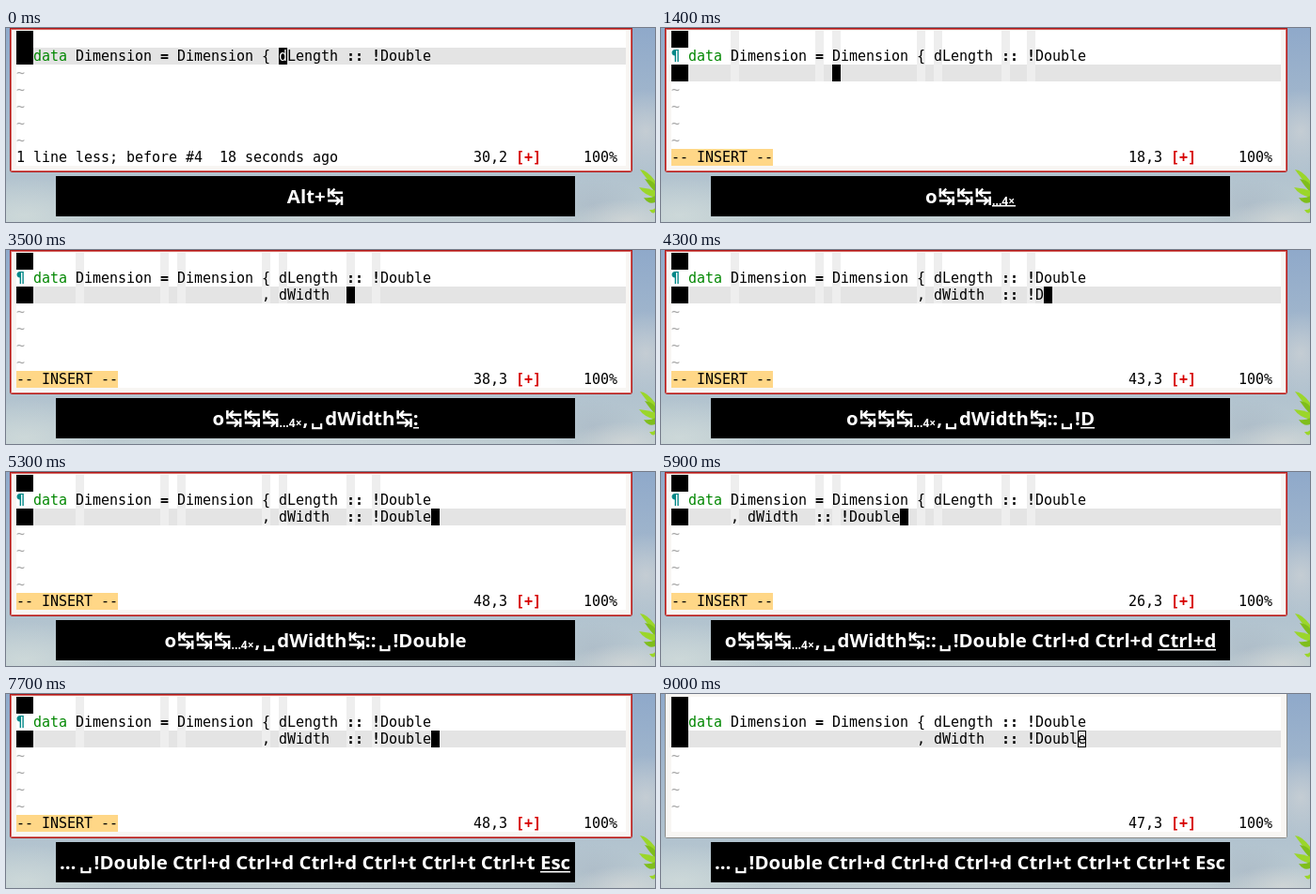
An HTML page with a canvas for the animation above (9.2 s loop, 690 px wide and 207 px high).

```html
<!DOCTYPE html>
<html>
<head>
<meta charset="utf-8">
<style>
html, body { margin: 0; width: 100%; height: 100%; overflow: hidden; background: #b4c4d0; }
canvas { display: block; width: 690px; height: 207px; }
</style>
</head>
<body>
<canvas id="stage" width="690" height="207"></canvas>
<script>
const LOOP = 9200;
const ctx = document.getElementById('stage').getContext('2d');
const MONO = '"DejaVu Sans Mono", monospace';
const SANS = '"Noto Sans", "Open Sans", sans-serif';
const CELL = 9, ROW = 18, LEFT = 11, TOP = 3, TEXT = 29, RIGHT = 659;
const STOPS = [0, 5, 15, 17, 27];
const GUIDES = [5, 15, 17, 27, 29, 37, 40];
const TAB = '↹', SPACE = '␣', REPEAT = '×';

// [time shown in key bar, label, time applied in editor]
const KEYS = [
  [200, 'o', 400], [600, TAB, 700], [1000, TAB, 1000], [1200, TAB, 1200],
  [1400, REPEAT, 1500], [1700, ',', 1900], [1900, SPACE, 2000],
  [2100, 'd', 2200], [2200, 'W', 2300], [2500, 'i', 2500],
  [2800, 'd', 2800], [2800, 't', 2800], [2800, 'h', 2800], [3100, TAB, 3200],
  [3500, ':', 3600], [3600, ':', 3700], [3800, SPACE, 3800], [4000, '!', 4000],
  [4200, 'D', 4300], [4500, 'o', 4500], [4600, 'u', 4700], [4800, 'b', 4800],
  [4900, 'l', 5000], [5100, 'e', 5100],
  [5400, ' Ctrl+d', 5500], [5600, ' Ctrl+d', 5700], [5900, ' Ctrl+d', 5900],
  [6400, ' Ctrl+t', 6400], [6600, ' Ctrl+t', 6700], [6900, ' Ctrl+t', 7000],
  [7700, ' Esc', 7800]
];
const IDLE = [400, 1600, 5300, 6100, 7200, 7900];
const SETTLED = 8800, BLURRED = 9000;

function box(x, y, w, h, color) {
  ctx.fillStyle = color;
  ctx.fillRect(x, y, w, h);
}

function glow(x, y, rx, ry, rgb, alpha) {
  ctx.save();
  ctx.translate(x, y);
  ctx.scale(rx, ry);
  const g = ctx.createRadialGradient(0, 0, 0, 0, 0, 1);
  g.addColorStop(0, `rgba(${rgb},${alpha})`);
  g.addColorStop(1, `rgba(${rgb},0)`);
  ctx.fillStyle = g;
  ctx.fillRect(-1, -1, 2, 2);
  ctx.restore();
}

function drawSky() {
  const g = ctx.createLinearGradient(0, 0, 0, 207);
  g.addColorStop(0, '#8fa9ca');
  g.addColorStop(0.55, '#a9bccd');
  g.addColorStop(1, '#bccbd1');
  ctx.fillStyle = g;
  ctx.fillRect(0, 0, 690, 207);
  glow(20, 200, 90, 40, '212,222,220', 0.7);
  glow(330, 205, 260, 50, '205,216,218', 0.6);
  glow(680, 110, 40, 45, '208,212,214', 0.7);
  glow(625, 190, 50, 30, '168,182,196', 0.6);
  glow(660, 205, 60, 22, '214,217,216', 0.7);
  const tips = [[674, 151], [679, 161], [673, 170], [678, 181], [684, 194]];
  tips.forEach(([x, y], i) => {
    ctx.fillStyle = i % 2 ? '#7fbe1c' : '#9bd62a';
    ctx.beginPath();
    ctx.moveTo(x, y);
    ctx.quadraticCurveTo(x + 9, y + 1, 692, 166 + i * 4);
    ctx.lineTo(692, 173 + i * 4);
    ctx.quadraticCurveTo(x + 6, y + 9, x, y);
    ctx.fill();
  });
}

function drawWindow(focused) {
  ctx.beginPath();
  ctx.roundRect(4, 0, 662, 154, [0, 0, 3, 3]);
  ctx.fillStyle = focused ? '#b01818' : '#8b8b88';
  ctx.fill();
  if (focused) box(5, 1, 660, 152, '#d86a66');
  box(focused ? 6 : 5, focused ? 2 : 0, focused ? 658 : 660, focused ? 150 : 153, '#f8f6f3');
  box(LEFT, TOP, RIGHT - LEFT, 144, '#fff');
}

const rowY = row => TOP + row * ROW;

function type(text, x, row, color = '#000', bold = false) {
  ctx.font = `${bold ? 'bold ' : ''}15px ${MONO}`;
  ctx.fillStyle = color;
  [...text].forEach((c, i) => ctx.fillText(c, x + i * CELL, rowY(row) + 14));
}

function code(text, col, row) {
  let x = TEXT + col * CELL;
  for (const part of text.split(/(data|[=:!]+)/)) {
    type(part, x, row, part === 'data' ? '#008700' : '#000', /^[=:!]/.test(part));
    x += part.length * CELL;
  }
}

function editorState(t) {
  const s = { insert: false, started: false, level: 0, text: '' };
  for (const [, key, at] of KEYS) {
    if (at > t) break;
    if (!s.started) s.started = s.insert = true;
    else if (key === ' Esc') s.insert = false;
    else if (key === ' Ctrl+d') s.level--;
    else if (key === ' Ctrl+t' || key === REPEAT) s.level++;
    else if (key === TAB) { if (s.text) s.text += '  '; else s.level++; }
    else s.text += key === SPACE ? ' ' : key;
  }
  return s;
}

function drawEditor(t) {
  const s = editorState(t);
  const settled = t >= SETTLED, focused = t < BLURRED;
  const line = s.started ? 2 : 1;
  const marks = s.started && !settled;
  const first = 'data Dimension = Dimension { dLength :: !Double';
  let col = s.started ? STOPS[s.level] + s.text.length : 29;
  if (s.started && !s.insert) col--;

  drawWindow(focused);
  box(TEXT, rowY(line), RIGHT - TEXT, ROW, '#e4e4e4');
  if (marks) for (const g of GUIDES) box(TEXT + g * CELL, TOP, CELL, ROW * 3, '#eeeeee');
  for (let r = 0; r <= line; r++) {
    if (!(marks && r === 1)) box(LEFT, rowY(r), 18, ROW, '#000');
  }
  if (marks) type('¶', LEFT, 1, '#008787', true);

  code(first, 0, 1);
  if (s.started) code(s.text, STOPS[s.level], 2);
  for (let r = line + 1; r < 7; r++) type('~', LEFT, r, '#a8a8a8');

  const cx = TEXT + col * CELL, cy = rowY(line);
  if (focused) {
    box(cx, cy, CELL, ROW, '#000');
    const under = s.started ? (s.insert ? '' : 'e') : 'd';
    type(under, cx, line, '#fff');
  } else {
    ctx.strokeStyle = '#000';
    ctx.lineWidth = 1;
    ctx.strokeRect(cx + 0.5, cy + 0.5, CELL - 1, ROW - 1);
  }

  if (s.insert) {
    box(LEFT, rowY(7), 12 * CELL, ROW, '#ffd787');
    type('-- INSERT --', LEFT, 7);
  } else if (!s.started) {
    type('1 line less; before #4  18 seconds ago', LEFT, 7);
  }
  if (s.insert || !s.started || settled) {
    const pos = `${col + 1},${line + 1}`;
    type(pos, 497, 7);
    type('[+]', 497 + (pos.length + 1) * CELL, 7, '#d70000', true);
    type('100%', 614, 7);
  }
}

const BAR_FONT = `bold 20.4px ${SANS}`;

function keyWidth(c) {
  if (c === TAB) return 19.5;
  if (c === SPACE) return 18;
  if (c === REPEAT) return 25;
  ctx.font = BAR_FONT;
  return ctx.measureText(c).width;
}

function drawKey(c, x, w) {
  ctx.fillStyle = '#fff';
  if (c === TAB || c === SPACE) {
    ctx.font = `bold ${c === TAB ? 22 : 19}px "DejaVu Sans", sans-serif`;
    ctx.textAlign = 'center';
    ctx.fillText(c, x + w / 2 + 0.5, 187);
    ctx.textAlign = 'left';
  } else if (c === REPEAT) {
    ctx.font = `bold 12px ${SANS}`;
    ctx.fillText('...4×', x, 189);
  } else {
    ctx.font = BAR_FONT;
    ctx.fillText(c, x, 187);
  }
}

function drawBar(t) {
  box(53, 158, 552, 43, '#000');
  const shown = KEYS.filter(k => k[0] <= t);
  const last = shown.length ? shown[shown.length - 1] : null;
  const chars = [...(last ? shown.map(k => k[1]).join('') : 'Alt+' + TAB)];
  const widths = chars.map(keyWidth);
  const total = widths.reduce((a, b) => a + b, 0);
  const cut = total > 544;
  let x = cut ? 600 - total : 329 - total / 2;
  if (cut) {
    ctx.font = BAR_FONT;
    ctx.fillStyle = '#fff';
    ctx.fillText('…', 57, 187);
  }
  const idle = !last || IDLE.some(i => i > last[0] && i <= t);
  const tail = last ? chars.length - last[1].trim().length : 0;
  let from = 0;
  chars.forEach((c, i) => {
    if (i === tail) from = x;
    if (!cut || x >= 75) drawKey(c, x, widths[i]);
    x += widths[i];
  });
  if (!idle) box(Math.round(from), 189, Math.round(x) - Math.round(from), 1.5, '#fff');
}

function frame(now) {
  const t = now % LOOP;
  drawSky();
  drawEditor(t);
  drawBar(t);
  requestAnimationFrame(frame);
}

let start;
requestAnimationFrame(function begin(now) {
  start = now;
  requestAnimationFrame(function tick(n) {
    frameAt(n - start);
    requestAnimationFrame(tick);
  });
  frameAt(0);
});

function frameAt(ms) {
  const t = ms % LOOP;
  drawSky();
  drawEditor(t);
  drawBar(t);
}
</script>
</body>
</html>
```
